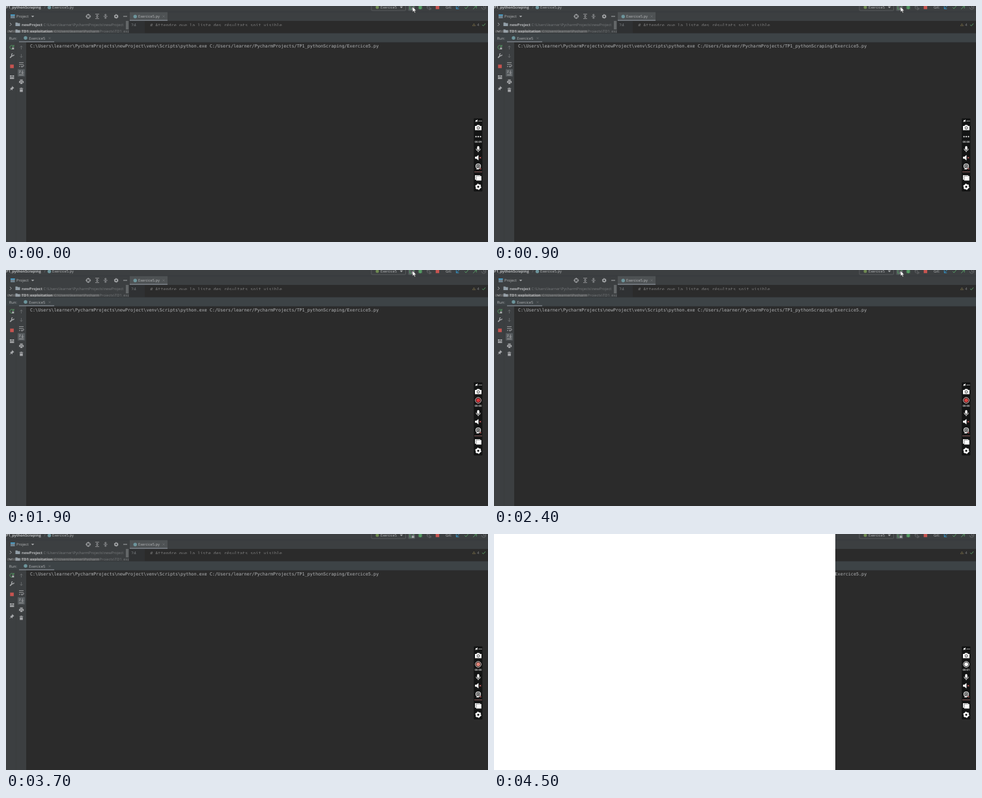
These frames come from a looping animation (740 px wide and 364 px high, 8000 ms). An HTML page:

```html
<!DOCTYPE html>
<html lang="fr">
<head>
<meta charset="utf-8">
<title>Console</title>
<style>
html, body { margin: 0; width: 100%; height: 100%; overflow: hidden; background: #2b2b2b; }
svg { display: block; width: 740px; height: 364px; }
text { font: 5.75px "Open Sans", "Noto Sans", sans-serif; fill: #b4b6b8; text-rendering: geometricPrecision; white-space: pre; }
.b { font-weight: 700; font-size: 5.7px; }
.dim { fill: #777a7c; }
.mono { font: 6.74px "DejaVu Sans Mono", "Noto Sans Mono", monospace; }
.clock { font-size: 4.3px; font-weight: 600; fill: #e6e6e6; text-anchor: middle; }
.ln { fill: none; stroke: #a6a8aa; stroke-width: 1; }
.ic { fill: #a6a8aa; }
.wh { fill: #fff; }
.wl { fill: none; stroke: #fff; stroke-width: .9; }
.green { stroke: #559a63; }
</style>
</head>
<body>
<svg viewBox="0 0 740 364">
  <defs>
    <clipPath id="treeClip"><rect y="23" width="188.5" height="18.6"/></clipPath>
    <clipPath id="codeClip"><rect x="189" y="23" width="551" height="8"/></clipPath>
    <circle id="py" r="2.7" fill="#6d959c"/>
    <path id="close" d="M-1.5-1.5l3 3m0-3l-3 3" fill="none" stroke="#6f7173" stroke-width=".6"/>
    <path id="caret" d="M-2.3-1.2h4.6l-2.3 2.6z" class="ic"/>
    <path id="folder" d="M-3.5-2.8h2.8l1 1.1h3.2v4.5h-7z" fill="#929fa8"/>
    <g id="gear" fill="none" stroke="currentColor">
      <circle r="2.3" stroke-width="1.9"/>
      <circle r="3.4" stroke-width="1" stroke-dasharray="1.78 1.78"/>
    </g>
  </defs>

  <rect width="740" height="364" fill="#2b2b2b"/>
  <rect width="740" height="23" fill="#3c3f41"/>
  <path d="M0 9h740" stroke="#35383a" stroke-width=".6"/>

  <!-- breadcrumb -->
  <text x="0" y="4.3" class="b">P1_pythonScraping</text>
  <text x="58.5" y="4.3" class="dim">/</text>
  <use href="#py" x="66.5" y="2.3"/>
  <text x="71" y="4.3">Exercice5.py</text>

  <!-- run toolbar -->
  <rect x="561" y="-4" width="52.5" height="11" rx="1" fill="#3c3f41" stroke="#5e6163" stroke-width=".8"/>
  <circle cx="570" cy="2" r="2.5" fill="#6f8a52"/>
  <text x="575" y="4.2">Exercice5</text>
  <use href="#caret" x="607" y="2"/>
  <rect x="617.5" y="-3" width="10.5" height="10.5" rx="1" fill="#53585b"/>
  <path d="M625.5 2v-2.5h-5.5v5.5h2.5" class="ln green"/>
  <rect x="623" y="2.6" width="3.6" height="3.4" class="ic"/>
  <ellipse cx="636" cy="2.3" rx="2.3" ry="3" fill="#559a63"/>
  <path d="M632.8 0l6.4 4.6m0-4.6l-6.4 4.6m-.2-2.3h6.8" class="ln green" style="stroke-width:.7"/>
  <path d="M646.5-1v3.5q0 1.5 2 2.3M646.5 1h4.5M650 2.5l3 1.8-3 1.7z" class="ln" style="stroke:#6c6f71;stroke-width:.8"/>
  <rect x="659.7" y="-1" width="5.4" height="5.8" fill="#c75450"/>
  <text x="675" y="4.2">Git:</text>
  <path d="M696.3-.7l-5 5m0-4v4h4" class="ln" style="stroke:#3592c4"/>
  <path d="M704.2 2.2l2 2 3.8-4.6" class="ln green"/>
  <path d="M717.2 4.8l5-5m-4 0h4v4" class="ln green"/>
  <path d="M733.5 0v2.5h2M730.3 2a3.2 3.2 0 1 0 3.2-3.2" class="ln" style="stroke:#6c6f71;stroke-width:.8"/>

  <!-- project header -->
  <rect x="7" y="13" width="6.6" height="6" fill="#6e7f8a"/>
  <rect x="7" y="13" width="6.6" height="1.6" fill="#40a0cf"/>
  <text x="16" y="18.2">Project</text>
  <use href="#caret" x="41" y="16.2"/>
  <circle cx="126.3" cy="16" r="3" class="ln"/>
  <path d="M126.3 12v3m0 2v3m-4-4h3m2 0h3" class="ln"/>
  <path d="M137 12.6h6m-6 6.8h6M140 14v4m-1.6-2.6l1.6-1.5 1.6 1.5m-3.2 1.2l1.6 1.5 1.6-1.5" class="ln" style="stroke-width:.8"/>
  <path d="M149.8 16h6M152.8 12v2.6m0 2.8v2.6m-1.6-6.6l1.6 1.4 1.6-1.4m-3.2 5.2l1.6-1.4 1.6 1.4" class="ln" style="stroke-width:.8"/>
  <use href="#gear" transform="translate(169.2 16) scale(.88)" color="#a6a8aa"/>
  <path d="M180 16h6" class="ln"/>

  <!-- project tree -->
  <rect y="23" width="189" height="19" fill="#3c3f41"/>
  <g clip-path="url(#treeClip)">
    <path d="M6 26l2.3 2.3L6 30.6M4.8 37.8l2.4 2.3 2.4-2.3" class="ln"/>
    <use href="#folder" x="18" y="28.3"/>
    <text x="24" y="30.5" class="b">newProject</text>
    <text x="57.5" y="30.5" class="dim">C:\Users\learner\PycharmProjects\newProject</text>
    <use href="#folder" x="18" y="39"/>
    <text x="24" y="41" class="b">TD1_exploitation</text>
    <text x="74" y="41" class="dim">C:\Users\learner\PycharmProjects\TD1_exploitation</text>
    <rect x="2" y="37.3" width="141" height="4" fill="#a6a6a6" opacity=".27"/>
    <rect x="184" y="23" width="4.4" height="13" fill="#636668"/>
  </g>

  <!-- editor -->
  <rect x="190" y="9.5" width="58" height="13.5" fill="#4e5254"/>
  <rect x="190" y="21.3" width="58" height="1.7" fill="#747a80"/>
  <use href="#py" x="198.3" y="16.2"/>
  <text x="203" y="18.3">Exercice5.py</text>
  <use href="#close" x="242" y="16"/>
  <rect x="189" y="23" width="24" height="19" fill="#2f3133"/>
  <g clip-path="url(#codeClip)">
    <text x="192" y="32.2" class="mono" style="fill:#75797c">24</text>
    <text x="221.2" y="32.2" class="mono" style="fill:#808080"># Attendre que la liste des résultats soit visible</text>
    <path d="M718.4 27.2l2.1 3.5h-4.2z" fill="none" stroke="#776d48" stroke-width=".8"/>
    <text x="723.3" y="31" style="fill:#85888a">4</text>
    <path d="M731 28.9l1.8 1.8 3.2-3.6" class="ln green"/>
  </g>

  <!-- run window -->
  <rect y="42" width="740" height="14" fill="#3d4346"/>
  <path d="M0 42h740M0 56h740" stroke="#313537" stroke-width=".7"/>
  <text x="4.7" y="52">Run:</text>
  <use href="#py" x="30" y="49.3"/>
  <text x="35.3" y="52">Exercice5</text>
  <use href="#close" x="67" y="49.7"/>
  <rect x="20" y="54.4" width="54" height="1.6" fill="#747a80"/>
  <rect y="56" width="31" height="308" fill="#3c3f41"/>
  <path d="M15.5 56v308" stroke="#383b3d" stroke-width=".7"/>
  <text x="37" y="64.2" class="mono">C:\Users\learner\PycharmProjects\newProject\venv\Scripts\python.exe C:/Users/learner/PycharmProjects/TP1_pythonScraping/Exercice5.py</text>

  <!-- run side buttons -->
  <path d="M11.6 62.2a3 3 0 1 0-.3 3.4M12 60v2.6h-2.7" class="ln green"/>
  <rect x="9.3" y="64" width="3" height="3" class="ic"/>
  <path d="M6.2 79.8l3.6-3.6" class="ln" style="stroke-width:1.7"/>
  <path d="M12.2 75a1.8 1.8 0 1 1-2-1.7" class="ln" style="stroke-width:1.3"/>
  <rect x="6.3" y="90.4" width="5.6" height="5.4" fill="#c75450"/>
  <path d="M6 107h2.8v2.3h-2.8zm3.6 0h2.8v2.3h-2.8zm-3.6 3.1h6.4v2.5h-6.4z" class="ic"/>
  <path d="M9.3 123.3l3.2 3.2-1 .4-1.6 1.6-.3 1.8-3.6-3.6 1.8-.3 1.6-1.6z" class="ic"/>
  <path d="M8 128l-2 2.2" class="ln" style="stroke-width:.8"/>
  <path d="M23.5 67v-5.5m-2 2l2-2 2 2M23.5 74v5.5m-2-2l2 2 2-2" class="ln" style="stroke:#626567"/>
  <path d="M20 87.4h7M20 90.3h5.6a1.5 1.5 0 0 1 0 3.2h-2m1.2-1.3l-1.3 1.3 1.3 1.2M20 93.4h2" class="ln" style="stroke-width:.9"/>
  <rect x="18" y="97.3" width="11" height="11.4" rx="1" fill="#565b5e"/>
  <path d="M20 100.3h3m-3 2.4h2m-2 3.6h7M25.3 99.5v4.8m-1.7-1.7l1.7 1.7 1.7-1.7" class="ln" style="stroke-width:.9"/>
  <path d="M21.5 113.5h4.2v1.7h-4.2zM20 115.7h7.2v3h-1.5v-1.2h-4.2v1.2h-1.5zM22 118h3.2v2.2h-3.2z" class="ic"/>
  <path d="M20.7 126.8h5.6v1h-5.6zM22.5 126h2v1h-2zM21.2 128.4h4.6v4.2h-4.6z" class="ic"/>

  <path id="cursor" d="M624.3 1.2v8l1.8-1.6 1.3 2.9 1.2-.6-1.3-2.7h2.4z" fill="#fff" stroke="#222" stroke-width=".4"/>
  <rect id="blank" width="524" height="364" fill="#fff"/>

  <!-- recorder -->
  <rect x="718.2" y="173.3" width="13.2" height="112.7" rx="1" fill="#131414"/>
  <path d="M721 176h2.8v2.4h-2.8z" class="wh"/>
  <path d="M720.3 179l3.7-4" class="wl" style="stroke-width:.6"/>
  <path d="M725.5 177.4h5" class="wl" stroke-dasharray="1.2 .7"/>
  <path d="M720 185h2.3l1-1.5h3.4l1 1.5h2.3v6.6h-10z" class="wh"/>
  <circle cx="725" cy="188" r="1.9" fill="#fff" stroke="#131414" stroke-width=".8"/>
  <g id="dots" class="wh"><circle cx="721.6" cy="201.5" r="1.1"/><circle cx="725" cy="201.5" r="1.1"/><circle cx="728.4" cy="201.5" r="1.1"/></g>
  <g id="record">
    <circle id="ring" cx="725" cy="201" r="4.4" fill="none" stroke-width=".9"/>
    <circle id="disc" cx="725" cy="201" r="3"/>
  </g>
  <text id="clock" x="725" y="211.4" class="clock"></text>
  <rect x="723.3" y="216" width="3.4" height="6" rx="1.7" class="wh"/>
  <path d="M721.8 220.2a3.2 3.2 0 0 0 6.4 0M725 223.4v2" class="wl"/>
  <path d="M720 232.4h2.2l3.2-2.6v8.4l-3.2-2.6h-2.2z" class="wh"/>
  <path d="M727 232.8l2.4 2.4m0-2.4l-2.4 2.4" stroke="#e06a6a" stroke-width=".9"/>
  <circle cx="725" cy="247" r="3.5" class="wl" style="stroke-width:1.1"/>
  <circle cx="725" cy="247" r="1.6" class="wl"/>
  <path d="M721.8 252h4.6l-1-1.3h-2.5z" class="wh"/>
  <path d="M727.3 249.8l2.2 2.2m0-2.2l-2.2 2.2" stroke="#e06a6a" stroke-width=".8"/>
  <path d="M719 255.9h12" stroke="#b27474" stroke-width=".8"/>
  <path d="M720 261h8v1.2h1.8v7h-8v-1.2h-1.8z" class="wh"/>
  <path d="M721.8 268v-5.8h6" fill="none" stroke="#131414" stroke-width=".5"/>
  <use href="#gear" transform="translate(725 278.8) scale(1.2)" color="#fff"/>
</svg>
<script>
const LOOP = 8000, START = 1600, POINTER_OFF = 3100, CUT = 4500;
const el = id => document.getElementById(id);
const [cursor, blank, dots, record, ring, disc, clock] =
  ["cursor", "blank", "dots", "record", "ring", "disc", "clock"].map(el);

// The record light fades from red to white: [time, red, green, blue]
const light = [
  [1600, 212, 52, 58], [1900, 212, 52, 58], [3000, 222, 84, 74],
  [3700, 226, 134, 122], [4200, 238, 182, 168]
];

function lightAt(t) {
  if (t >= CUT) return [255, 255, 255];
  const i = light.findIndex(k => k[0] > t);
  if (i < 0) return light[light.length - 1].slice(1);
  const a = light[Math.max(0, i - 1)], b = light[i];
  const p = a === b ? 0 : (t - a[0]) / (b[0] - a[0]);
  return [1, 2, 3].map(c => Math.round(a[c] + (b[c] - a[c]) * p));
}

const show = (node, on) => node.setAttribute("visibility", on ? "visible" : "hidden");
const rgb = c => `rgb(${c.join()})`;

function draw(t) {
  const color = lightAt(Math.floor(t / 100) * 100);
  show(dots, t < START);
  show(record, t >= START);
  show(cursor, t < POINTER_OFF);
  show(blank, t >= CUT);
  disc.setAttribute("fill", rgb(color));
  ring.setAttribute("stroke", rgb(color.map(c => Math.round((c + 3 * 255) / 4))));
  clock.textContent = t < 100 ? "00:09" : t < 4200 ? "00:00" : "00:01";
}

const origin = performance.now();
function tick() {
  draw((performance.now() - origin) % LOOP);
  requestAnimationFrame(tick);
}
tick();
</script>
</body>
</html>
```
